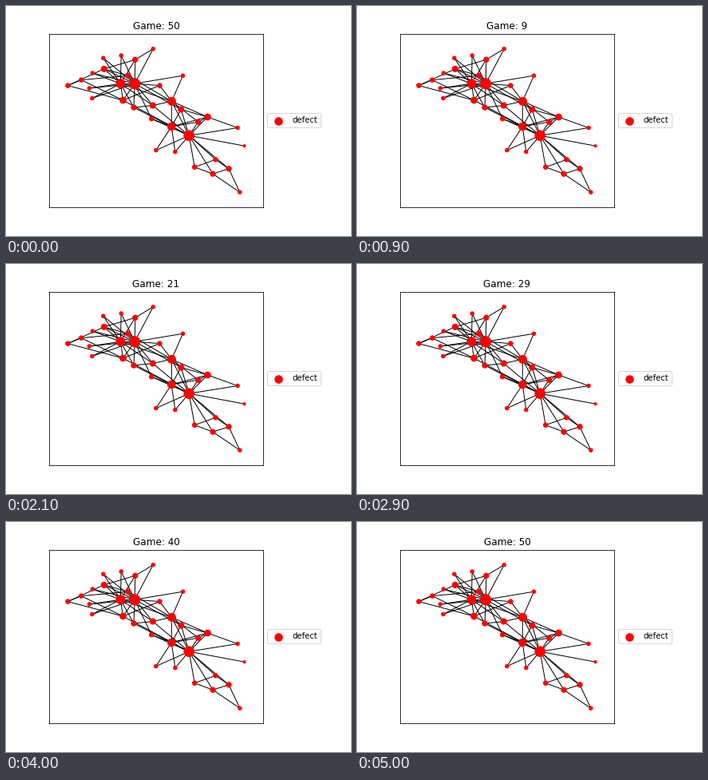
These frames come from a looping animation (432x288 px, 5100 ms). A matplotlib script:

```python
import matplotlib.pyplot as plt
from matplotlib.animation import FuncAnimation
from matplotlib.collections import LineCollection

WIDTH, HEIGHT, DPI = 432, 288, 72
GAMES = 50

# Node centres in stage pixels, y down.
POS = [
    (229.2, 162.2), (207.2, 151), (207.4, 119.3), (252.4, 139), (236.2, 201.7),
    (279, 203.8), (259, 210.2), (240.6, 145.2), (183.8, 124.5), (221.5, 87.2),
    (262.4, 192.3), (298.5, 175.2), (290, 152.5), (219.2, 129.5), (144.2, 62),
    (121.8, 65.2), (292.8, 233.2), (187.8, 180.6), (108.3, 84), (182.2, 141.2),
    (104.3, 103), (211.8, 182.6), (107.9, 115.5), (122.8, 78.8), (94.2, 92.6),
    (77.4, 99.6), (184.2, 53.7), (152.6, 87.2), (192.4, 99.6), (161.8, 67.2),
    (160, 127), (146.5, 118), (143.4, 97.2), (161.2, 97.2),
]

# Each node's neighbours with a higher index.
LINKS = {
    0: [*range(1, 9), 10, 11, 12, 13, 17, 19, 21, 31],
    1: [2, 3, 7, 13, 17, 19, 21, 30],
    2: [3, 7, 8, 9, 13, 27, 28, 32],
    3: [7, 12, 13],
    4: [6, 10],
    5: [6, 10, 16],
    6: [16],
    8: [30, 32, 33],
    23: [25, 27, 29, 32, 33],
    24: [25, 27, 31],
    25: [31],
    26: [29, 33],
    28: [31, 33],
    32: [33],
}
LINKS.update({n: [33] for n in (9, 13, 19, 27)})
LINKS.update({n: [32, 33] for n in (14, 15, 18, 20, 22, 29, 30, 31)})
EDGES = [(a, b) for a, ends in LINKS.items() for b in ends]
DEGREE = [sum(n in edge for edge in EDGES) for n in range(len(POS))]

COLORS = {
    "cooperate": "green",
    "defect": "red",
    "tit_for_tat": "yellow",
    "pavlov": "blue",
    "random": "pink",
}

# Nodes that do not defect yet, by game.
HOLDOUTS = {
    1: {
        "cooperate": [6, 12, 16, 17],
        "tit_for_tat": [4, 9, 20, 22],
        "pavlov": [15, 19, 21],
        "random": [14, 23, 25, 26, 28, 29],
    },
    2: {
        "tit_for_tat": [20, 22],
        "pavlov": [15],
        "random": [14, 23, 25, 26, 28, 29],
    },
}

fig = plt.figure(figsize=(WIDTH / DPI, HEIGHT / DPI), dpi=DPI, facecolor="white")
ax = fig.add_axes([0.125, 0.125, 0.62, 0.755])


def groups(game):
    """Split the nodes by strategy, in legend order."""
    held = HOLDOUTS.get(game, {})
    taken = {n for nodes in held.values() for n in nodes}
    defectors = [n for n in range(len(POS)) if n not in taken]
    split = {**held, "defect": defectors}
    return [(name, split[name]) for name in COLORS if name in split]


def draw(frame):
    game = frame or GAMES
    ax.clear()
    ax.add_collection(LineCollection(
        [(POS[a], POS[b]) for a, b in EDGES],
        colors="black", linewidths=1, zorder=1))
    for name, nodes in groups(game):
        xs, ys = zip(*(POS[n] for n in nodes))
        ax.scatter(xs, ys, s=[10 * DEGREE[n] for n in nodes],
                   color=COLORS[name], label=name, zorder=2)
    ax.set(xlim=(54, 321.84), ylim=(252, 34.56), xticks=[], yticks=[])
    ax.set_title(f"Game: {game}", fontsize=12)
    ax.legend(loc="center left", bbox_to_anchor=(1, 0.5), fontsize=10)
    return []


anim = FuncAnimation(fig, draw, frames=GAMES + 1, interval=100,
                     repeat=True, repeat_delay=0)
plt.show()
```
